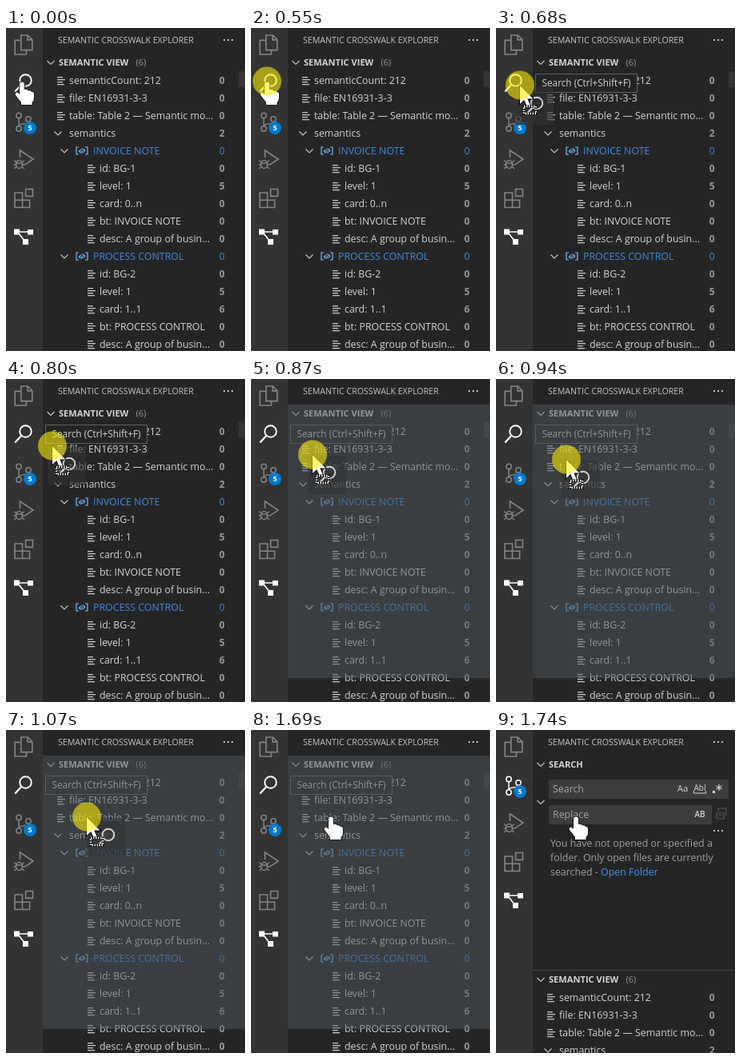
Animation, 299 px wide and 404 px high, one loop 2710 ms. Source, as an HTML page with a canvas:

```html
<!DOCTYPE html>
<html lang="en">
<head>
<meta charset="utf-8">
<title>Dragging a view into a sidebar</title>
<style>
  html, body { margin: 0; width: 100%; height: 100%; overflow: hidden; background: #252526; }
  canvas { display: block; width: 299px; height: 404px; }
</style>
</head>
<body>
<canvas id="stage" width="299" height="404"></canvas>
<script>
const ctx = document.getElementById('stage').getContext('2d');
const LOOP = 2710;
const FONT = '"Open Sans", "Noto Sans", sans-serif';
const GREY = '#858585', TEXT = '#d4d4d4', BLUE = '#4388dc', BAR = '#333333', PANEL = '#252526';

// Pointer path while dragging: [time, x, y]
const path = [
  [550, 20, 67], [620, 22, 68], [680, 30, 72], [740, 42, 77], [800, 58, 84],
  [870, 77, 95], [940, 88, 101], [1000, 96, 106], [1070, 101, 109]
];

function box(x, y, w, h, color) {
  ctx.fillStyle = color;
  ctx.fillRect(x, y, w, h);
}

function disc(x, y, r, color) {
  ctx.fillStyle = color;
  ctx.beginPath();
  ctx.arc(x, y, r, 0, 7);
  ctx.fill();
}

function ring(x, y, r, color, width = 1.5) {
  ctx.strokeStyle = color;
  ctx.lineWidth = width;
  ctx.beginPath();
  ctx.arc(x, y, r, 0, 7);
  ctx.stroke();
}

function svg(d, color, width) {
  const shape = new Path2D(d);
  if (width) {
    ctx.strokeStyle = color;
    ctx.lineWidth = width;
    ctx.stroke(shape);
  } else {
    ctx.fillStyle = color;
    ctx.fill(shape);
  }
}

// y is the vertical middle of the line; the baseline sits on a whole pixel
function label(s, x, y, color = TEXT, size = 12.4, weight = 400, align = 'left') {
  ctx.font = `${weight} ${size}px ${FONT}`;
  ctx.textAlign = align;
  ctx.fillStyle = color;
  ctx.fillText(s, x, Math.round(y + size * 0.36));
}

function at(x, y, draw) {
  ctx.save();
  ctx.translate(x, y);
  draw();
  ctx.restore();
}

const chevron = (x, y) => at(x, y, () => svg('M-4.5-2L0 2.5L4.5-2', '#c5c5c5', 1.2));

function dots(x, y) {
  for (const dx of [-5, 0, 5]) box(x + dx - 1, y - 1, 2, 2, '#c5c5c5');
}

// Activity bar icons, centred on the origin
function filesIcon() {
  svg('M-3.2-12H5.3L10.8-6.4V6.6H-3.2ZM5-11.8V-6.1H10.6', GREY, 1.6);
  svg('M-3.2-5.6H-10.8V12H3.4V6.6', GREY, 1.6);
}

function searchIcon(color = '#ffffff') {
  ring(2.5, -3.5, 7.3, color, 1.9);
  svg('M-2.9 2L-10.7 10.5', color, 2.2);
}

function branchIcon(color) {
  ring(-6, -7.5, 3.2, color);
  ring(-6, 9, 3.2, color);
  ring(6, -3, 3.2, color);
  svg('M-6-4.3V5.8M6 .2C6 4.5-5 1-5.8 5.8', color, 1.5);
  disc(8, 8, 8, '#007acc');
  label('5', 8, 8, '#ffffff', 9, 700, 'center');
}

function debugIcon() {
  svg('M-4.5-3V-12L12-1L1.5 6.2', GREY, 1.6);
  ctx.beginPath();
  ctx.ellipse(-5.5, 5.5, 4, 5, 0, 0, 7);
  ctx.stroke();
  svg('M-9.3 4H-1.7M-12 .5L-9 3M1 .5L-2 3M-12.5 6H-9.5M1.5 6H-1.5M-12 11L-9 8.5M1 11L-2 8.5', GREY, 1.3);
}

function extensionsIcon() {
  svg('M-11-7H-1.5V2.2H7.6V11.5H-11ZM-11 2.2H-1.5V11.5M2.6-11.5H11.5V-2.6H2.6Z', GREY, 1.6);
}

function nodesIcon() {
  svg('M-12-9.5h7v7h-7ZM5-9h7v6.5h-7ZM-1 3h7v7h-7Z', '#ffffff');
  svg('M-6-6H6M-6-4L1 5', '#ffffff', 1.6);
}

function activityBar(moved) {
  box(0, 0, 46, 404, BAR);
  const icons = [filesIcon, () => searchIcon(), () => branchIcon(moved ? '#ffffff' : GREY),
    debugIcon, extensionsIcon, nodesIcon];
  if (moved) icons.splice(1, 1);
  icons.forEach((icon, i) => at(22, 21 + i * 48, icon));
}

function listIcon(x, y) {
  [7, 10, 7, 9].forEach((w, i) => box(x, y - 4.5 + i * 3, w, 1.3, '#c5c5c5'));
}

function fieldIcon(x, y) {
  at(x, y, () => {
    svg('M-4-4.5H-7V4.5H-4M4-4.5H7V4.5H4', '#75beff', 1.2);
    svg('M-3.5 0L.8-2.6L3.5-1.3V1L-.8 2.8L-3.5 1.6ZM-3.5 0L-.8 1L3.5-1.3', '#75beff', 1);
  });
}

function group(name, id, card) {
  return [
    { kind: 'group', text: name, count: 0 },
    { kind: 'leaf', text: 'id: ' + id, count: 0 },
    { kind: 'leaf', text: 'level: 1', count: 5 },
    { kind: 'leaf', text: 'card: ' + card, count: card === '1..1' ? 6 : 0 },
    { kind: 'leaf', text: 'bt: ' + name, count: 0 },
    { kind: 'leaf', text: 'desc: A group of busin...', count: 0 }
  ];
}

const rows = [
  { kind: 'top', text: 'semanticCount: 212', count: 0 },
  { kind: 'top', text: 'file: EN16931-3-3', count: 0 },
  { kind: 'top', text: 'table: Table 2 — Semantic mo...', count: 0 },
  { kind: 'root', text: 'semantics', count: 2 },
  ...group('INVOICE NOTE', 'BG-1', '0..n'),
  ...group('PROCESS CONTROL', 'BG-2', '1..1')
];

function tree(top) {
  chevron(56, top);
  label('SEMANTIC VIEW', 66, top, TEXT, 11.1, 700);
  label('(6)', 162.5, top, '#969696', 11);
  rows.forEach((row, i) => {
    const y = top + 22.5 + i * 22;
    if (y > 410) return;
    const blue = row.kind === 'group';
    if (row.kind === 'top') listIcon(64, y);
    if (row.kind === 'leaf') listIcon(102, y);
    if (row.kind === 'root') chevron(65, y);
    if (blue) {
      chevron(73, y);
      fieldIcon(95, y);
    }
    const x = blue ? 109 : row.kind === 'leaf' ? 117 : 79;
    label(row.text, x, y, blue ? BLUE : TEXT);
    label(row.count, 273.5, y, blue ? BLUE : '#999999', 12, blue ? 400 : 700, 'right');
  });
}

function searchPane() {
  chevron(56, 43);
  label('SEARCH', 66, 43, TEXT, 11.1, 700);
  box(66, 62, 225, 24, '#3c3c3c');
  box(66, 94, 204, 24, '#3c3c3c');
  label('Search', 71, 73.5, '#a6a6a6');
  label('Replace', 71, 105.5, '#a6a6a6');
  label('Aa', 233.5, 73, TEXT, 11.5, 400, 'center');
  label('Abl', 255, 72, TEXT, 10, 400, 'center');
  svg('M247.5 76V79H262.5V76', TEXT, 1);
  box(271, 76, 3, 3, TEXT);
  svg('M279 68V76M275.5 70L282.5 74M282.5 70L275.5 74', TEXT, 1.2);
  label('AB', 255, 105.5, TEXT, 10, 600, 'center');
  svg('M278 102V98H288V106H286M276 104H285V111H276ZM278 107H283', '#5a5a5a', 1.2);
  chevron(56, 90);
  dots(278, 126);
  label('You have not opened or specified a', 68, 142, '#a0a0a0');
  label('folder. Only open files are currently', 68, 160, '#a0a0a0');
  label('searched - ', 68, 178, '#a0a0a0');
  label('Open Folder', 131, 178, '#3794ff');
  box(46, 300, 253, 1, '#464647');
}

function tooltip() {
  box(49, 57, 128, 24, '#606060');
  box(50, 58, 126, 22, PANEL);
  label('Search (Ctrl+Shift+F)', 57.5, 69, TEXT, 11.8);
}

function hand(x, y) {
  at(x, y, () => {
    const d = 'M-3 2Q-3-.5 0-.5Q3-.5 3 2V9Q7 8 8 10.5Q11 9.5 12 12Q15 11.5 15 15V20' +
      'Q15 23 12.5 25V28H-1V25L-8 16Q-9 13-6.5 12.5Q-4.5 12.5-3 15Z';
    svg(d, '#1b1b1b', 2);
    svg(d, '#ffffff');
  });
}

function arrow(x, y) {
  at(x, y, () => {
    const d = 'M0 0V23L5.3 18L9 26.5L13 24.8L9.3 16.5H16.5Z';
    svg(d, '#000000', 1.8);
    svg(d, '#ffffff');
    const frame = 'M5 26H20V35H5Z';
    svg(frame, '#000000', 3);
    ctx.setLineDash([1.5, 1.5]);
    svg(frame, '#ffffff', 2.4);
    ctx.setLineDash([]);
  });
}

function dragImage(x, y) {
  at(x, y, () => {
    ctx.globalAlpha = 0.62;
    box(0, 0, 48, 48, BAR);
    ctx.globalAlpha = 0.85;
    at(24.5, 24.5, () => searchIcon('#eeeeee'));
  });
}

function pointerAt(t) {
  return path.filter(p => p[0] <= t).pop() || path[0];
}

function draw(t) {
  const dropped = t >= 1740;
  box(0, 0, 299, 404, PANEL);
  label('SEMANTIC CROSSWALK EXPLORER', 65, 15, '#c4c4c4', 10.65);
  dots(278, 15);
  if (dropped) {
    searchPane();
    tree(312);
  } else {
    tree(43);
    box(291, 54, 8, 20, '#353536');
    if (t >= 680) tooltip();
    if (t >= 870) box(46, 32, 253, 342, 'rgba(83,89,93,.5)');
  }
  activityBar(dropped);

  const [, x, y] = pointerAt(t);
  const released = t >= 1690;
  const dragging = t >= 680 && !released;
  if (dragging) {
    dragImage(x - (t >= 1070 ? 0 : 6), y + 1);
    arrow(x, y);
  } else {
    hand(released ? 100 : x, released ? 109 : y + 1);
  }
  // The press highlight tints the pointer too
  if (t >= 550 && !released) disc(x, y - 0.5, 18, 'rgba(255,240,10,.58)');
}

const start = performance.now();
function tick() {
  draw((performance.now() - start) % LOOP);
  requestAnimationFrame(tick);
}
tick();
</script>
</body>
</html>
```
